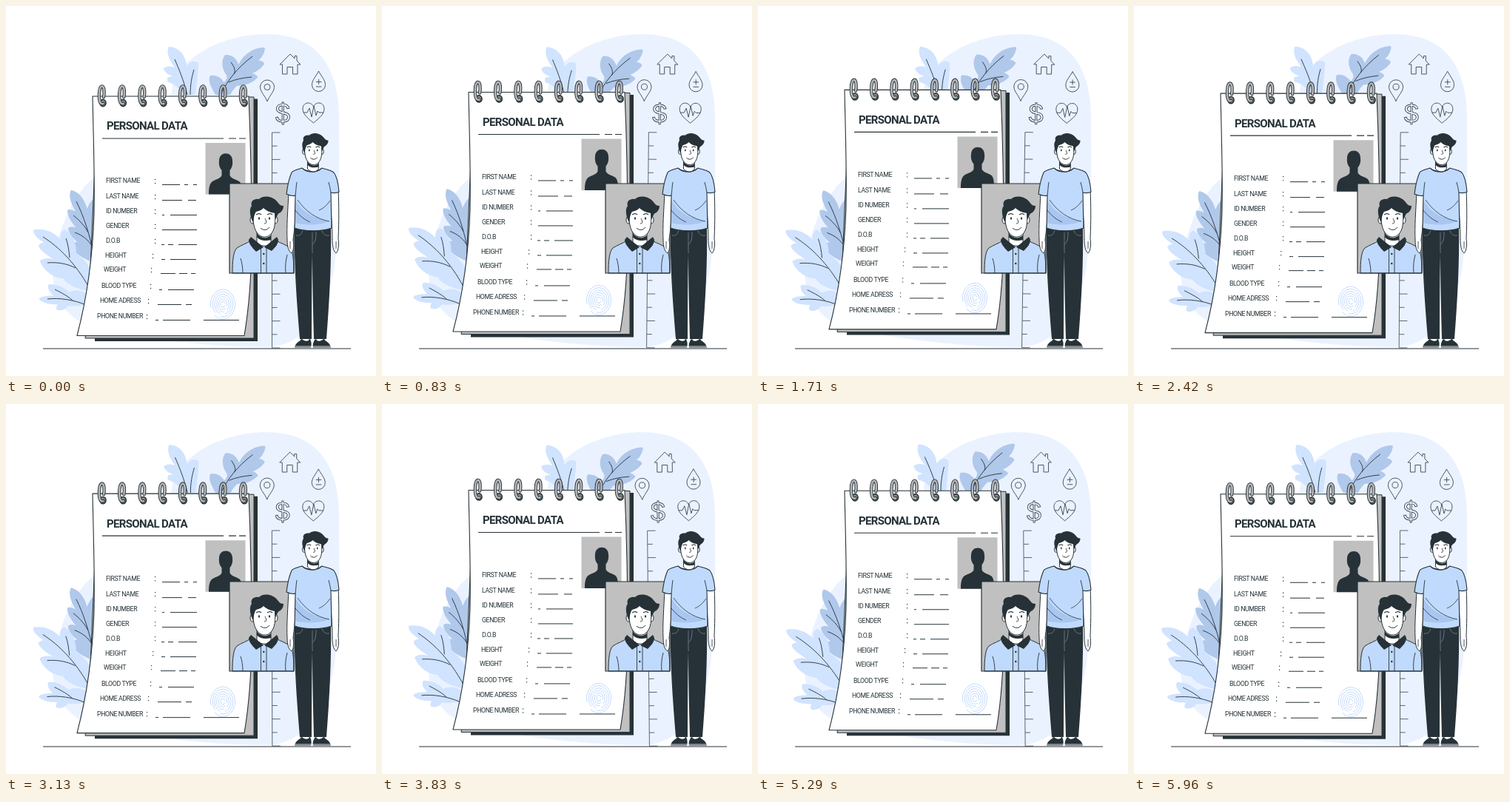
Recreate the animation shown at these times as an HTML page with a canvas. Size 500 by 500 pixels, loop 6 s.

```html
<!DOCTYPE html>
<html lang="en">
<head>
<meta charset="utf-8">
<title>Personal data</title>
<style>
html, body { margin: 0; width: 100%; height: 100%; overflow: hidden; background: #fff; }
canvas { display: block; width: 500px; height: 500px; }
</style>
</head>
<body>
<canvas id="stage"></canvas>
<script>
const canvas = document.getElementById('stage');
const ctx = canvas.getContext('2d');
const dpr = window.devicePixelRatio || 1;
canvas.width = canvas.height = 500 * dpr;

const INK = '#263238', GRAY = '#c0c0c0', BLUE = '#c0dafe', SHADE = '#a9c6f0', PALE = '#ebf2ff';
const LEAF = '#d0e3ff', LEAF_DARK = '#b0c8ea', WHITE = '#fff';

// Shape helpers
function shape(d, fill, stroke, width = 1) {
  const path = new Path2D(d);
  if (fill) { ctx.fillStyle = fill; ctx.fill(path); }
  if (stroke) { ctx.strokeStyle = stroke; ctx.lineWidth = width; ctx.stroke(path); }
}
const line = (d, width = 1, color = INK) => shape(d, null, color, width);
function oval(x, y, rx, ry, fill, stroke, width = 1, from = 0, to = Math.PI * 2) {
  ctx.beginPath();
  ctx.ellipse(x, y, rx, ry, 0, from, to);
  if (fill) { ctx.fillStyle = fill; ctx.fill(); }
  if (stroke) { ctx.strokeStyle = stroke; ctx.lineWidth = width; ctx.stroke(); }
}
function spin(x, y, degrees, draw) {
  ctx.save();
  ctx.translate(x, y);
  ctx.rotate(degrees * Math.PI / 180);
  ctx.translate(-x, -y);
  draw();
  ctx.restore();
}

// Use the narrowest condensed face available, tightly spaced and sized to the lettering
const TRACKING = -0.045;
function pickFont(weight, size, sample, width) {
  const faces = ['Noto Sans', 'Open Sans', 'Roboto', 'Liberation Sans Narrow', 'Liberation Sans'];
  const make = (face, px) => `${weight} extra-condensed ${px}px "${face}", sans-serif`;
  const measure = face => {
    ctx.font = make(face, size);
    return ctx.measureText(sample).width + TRACKING * size * sample.length;
  };
  const best = faces.reduce((a, b) => measure(b) < measure(a) ? b : a);
  const px = size * Math.min(1, width / measure(best));
  return { font: make(best, px), spacing: `${TRACKING * px}px` };
}
const titleFont = pickFont(700, 22.5, 'PERSONAL DATA', 109);
const labelFont = pickFont(400, 12.8, 'PHONE NUMBER', 62);

// label, x, middle y, colon x, dashes as [from, to]
const rows = [
  ['FIRST NAME', 135, 236, 201, [[211, 235], [241, 246], [253, 258]]],
  ['LAST NAME', 135, 257, 201, [[211, 238], [246, 257]]],
  ['ID NUMBER', 135, 277, 201, [[211, 214], [222, 258]]],
  ['GENDER', 135, 297, 201, [[211, 258]]],
  ['D.O.B', 135, 317, 201, [[210, 214], [219, 226], [233, 258]]],
  ['HEIGHT', 134, 337, 198, [[210, 215], [222, 257]]],
  ['WEIGHT', 132, 356, 196, [[209, 229], [234, 245], [250, 256]]],
  ['BLOOD TYPE', 129, 378, 195, [[207, 211], [219, 254]]],
  ['HOME ADRESS', 127, 398, 192, [[205, 237], [243, 251]]],
  ['PHONE NUMBER', 123, 419, 190, [[202, 206], [212, 249]]]
];

function text(str, x, middle, { font, spacing }) {
  ctx.font = font;
  ctx.letterSpacing = spacing;
  ctx.fillStyle = INK;
  const m = ctx.measureText('H');
  ctx.fillText(str, x, middle + m.actualBoundingBoxAscent / 2);
  ctx.letterSpacing = '0px';
}

function drawBackdrop() {
  shape(`M224 118 C224 78 284 38 352 38 C420 38 450 82 450 150 C450 210 452 290 444 350
    C434 420 400 461 350 461 C280 461 210 452 140 440 C90 432 58 400 64 350
    C70 300 92 250 122 230 Z`, PALE);
}

// The matching outline rounds off the lobes
const leaf = (d, color) => shape(d, color, color, 4);

function drawPlants() {
  leaf(`M242 118 C236 110 228 103 220 101 L220 98 C226 97 230 96 231 94 C224 93 217 90 215 85
    C220 82 227 84 233 88 C230 80 218 70 221 57 C230 58 240 64 242 80 C243 87 245 87 247 81
    C250 77 254 76 258 78 C258 90 256 104 254 118 Z`, LEAF);
  line('M228 72 C234 86 240 100 245 120 M254 86 C251 96 249 106 249 120', 0.9);
  leaf(`M284 118 C280 110 275 103 277 96 C284 95 290 99 294 106 C300 102 301 97 300 93
    C293 84 293 74 297 68 C306 68 312 74 314 86 C318 70 332 59 348 58 C347 65 343 71 334 77
    C339 75 344 75 347 78 C341 86 333 90 322 92 C329 91 335 93 338 96 C330 104 320 106 311 106
    C306 111 303 115 302 118 Z`, LEAF_DARK);
  line('M290 120 C299 101 312 84 333 68 M304 76 C310 84 310 89 308 92 M332 96 C320 97 310 99 301 103', 0.9);
  leaf(`M122 346 C108 341 94 334 89 323 C93 320 98 321 105 323 C95 316 87 309 86 301
    C90 299 97 302 103 306 C94 296 85 286 85 277 C90 277 97 281 103 287 C93 274 86 260 89 251
    C98 254 107 264 109 282 C112 272 115 265 120 262 L128 262 Z`, LEAF_DARK);
  line('M95 264 C105 284 113 308 119 338 M91 283 C100 290 107 298 111 306 M93 306 C104 310 111 316 116 324', 0.9);
  leaf(`M116 384 C100 382 84 376 78 366 C66 366 53 357 48 345 C55 341 65 343 74 349
    C66 338 50 334 46 324 C50 320 56 322 62 326 C54 318 40 312 39 304 C54 302 68 309 78 324
    C74 314 75 307 79 304 C88 310 94 322 93 336 C102 341 112 353 116 362 Z`, LEAF);
  line('M50 312 C72 326 94 348 112 380 M56 347 C70 346 82 348 94 354 M81 314 C84 322 85 330 86 340', 0.9);
  leaf(`M110 401 C98 404 90 404 83 403 C80 408 75 410 70 409 C70 406 71 404 74 401
    C62 402 53 401 47 396 C53 393 62 393 70 394 C62 388 58 383 59 378 C68 378 78 382 85 389
    C94 384 102 386 112 392 Z`, LEAF);
  line('M56 396 C72 394 92 397 108 404 M66 383 C76 388 85 393 90 398', 0.9);
}

function drawRuler() {
  let marks = 'M359.5 171 V462';
  for (let i = 0; i < 17; i++) marks += `M359.5 ${171 + i * 18.19} h${i % 2 ? 7 : 11}`;
  line(marks, 0.9, '#455a64');
}

function drawIcons() {
  const c = '#37474f';
  line(`M370 79 L384 65 L390 71 V67.500 H393 V74 L398 79 H394 V92 H387.500 V82.500 H380 V92
    H373.500 V79 Z`, 0.9, c);
  line('M422.500 88 C419 95 413.500 100 413.500 106.500 A9 9 0 0 0 431.500 106.500 C431.500 100 426 95 422.500 88 Z', 0.9, c);
  line('M419 102.500 H426.500 M422.700 99 V106 M419 109 H426.500', 0.9, c);
  line('M353 129 C350 121 343.500 116 343.500 109.500 A9.500 9.500 0 0 1 362.500 109.500 C362.500 116 356 121 353 129 Z', 0.9, c);
  oval(353, 109.5, 4, 4, null, c, 0.9);
  ctx.font = '36px "Liberation Sans", Arial, sans-serif';
  ctx.textAlign = 'center';
  ctx.strokeStyle = c;
  ctx.lineWidth = 0.9;
  ctx.strokeText('$', 374, 157.5);
  ctx.textAlign = 'left';
  line('M415.500 158 C407 151 401 146 401 139 C401 130 412 128 415.500 136 C419 128 430 130 430 139 C430 146 424 151 415.500 158 Z', 0.9, c);
  line('M402 144 H407 L410 138 L413 150 L416 135 L419 148 L421 142 L423 144 H429', 0.9, c);
}

// A wire arch that hooks into a punched hole
function drawRing(x) {
  ctx.save();
  ctx.translate(x, 0);
  ctx.lineCap = 'round';
  oval(1.5, 131, 4, 4.6, '#8a8a8a', INK, 1.6);
  const wire = 'M2 132 C-3 134 -4 126 -3.500 118 C-3 106 2.500 106 3 114 C3.300 118 3 121 2.500 123';
  line(wire, 4.4);
  line(wire, 2.6, '#b5b5b5');
  ctx.restore();
}

function drawNotebook() {
  shape('M124 125.500 H340 V453 H120 V440 Z', INK);
  shape('M124 123 H335 V449 H107 L112 400 Z', GRAY, INK);
  shape(`M117 122 H328 C330 170 332 240 332 310 C332 370 328 410 322 445.500
    H96 C108 400 117 345 119 280 C120 225 118 175 117 122 Z`, WHITE, INK, 1.1);
  for (let i = 0; i < 8; i++) drawRing(129.500 + i * 27.3);

  text('PERSONAL DATA', 136, 162, titleFont);
  line('M130 179 H294 M301 179 H311 M315 179 H324', 1.1);

  for (const [label, x, y, colon, dashes] of rows) {
    text(label, x, y, labelFont);
    oval(colon + 0.6, y - 1.5, 0.7, 0.7, INK);
    oval(colon + 0.6, y + 3.5, 0.7, 0.7, INK);
    line(dashes.map(([a, b]) => `M${a} ${y + 5.5} H${b}`).join(''), 1);
  }

  // Portrait silhouette
  shape('M269.500 185 H323.500 V254.500 H269.500 Z', GRAY);
  shape(`M274 254.500 C274 246 275 240 279 237 C284 234 290 233 291.500 229 L291.500 222
    C288 218 287.500 213 288 209 C288 196 306 196 306 209 C306.500 213 306 218 302.500 222
    L302.500 229 C304 233 310 234 315 237 C319 240 319 247 319 254.500 Z`, INK);

  // Fingerprint
  const print = '#bdd5fb';
  for (let i = 0; i < 6; i++) {
    oval(293, 403, 3 + i * 2.7, 4 + i * 3.2, null, print, 0.9, 0.4 + i * 0.5, 6.1 + i * 0.5);
  }
  line('M267 424.500 H315', 1);
}

function drawFace(x, y, s) {
  ctx.save();
  ctx.translate(x, y);
  ctx.scale(s, s);
  const w = 1 / s;
  shape('M-9 14 V32 C-4 39 6 39 10 32 V14 Z', WHITE, INK, w);
  shape('M-9 20 C-4 27 4 28 10 23 L10 29 C3 31 -6 30 -9 25 Z', INK);
  oval(-15, 2, 3, 5, WHITE, INK, w);
  oval(16, 2, 3, 5, WHITE, INK, w);
  shape('M-14 -18 C-15 0 -14 12 -9 19 C-4 27 6 27 11 20 C17 12 16 0 15 -18 Z', WHITE, INK, w);
  shape(`M-14 6 C-13 0 -13 -5 -10 -9 C-5 -10 -2 -12 0 -14 C5 -9 11 -8 15 -7 L16 2 C18 -2 19 -6 21 -7
    C25 -9 27 -13 27 -17 C23 -17 21 -19 19 -22 C13 -30 0 -32 -6 -26 C-13 -27 -18 -23 -16 -17
    C-20 -12 -18 -2 -14 6 Z`, INK);
  line('M-10 -5 C-7 -7 -5 -7 -3 -5 M5 -5 C8 -7 10 -7 12 -5', 1.2 * w);
  oval(-6, 0, 1.1, 1.8, INK);
  oval(8, 0, 1.1, 1.8, INK);
  line('M2 0 C4 4 5 7 1 7', 0.9 * w);
  line('M-4 13 C0 17 5 16 8 12', w);
  ctx.restore();
}

function drawCard() {
  const frame = 'M302 240 H389 V361 H302 Z';
  shape(frame, GRAY);
  shape(`M306 361 C306 345 307 332 312 327 C318 323 325 321 331 317 L348 324 L365 317
    C372 321 380 323 385 328 C388 333 389 347 389 361 Z`, BLUE, INK);
  drawFace(348, 287, 1);
  shape('M331 312 L348 326 L338 332 C332 326 328 321 328 316 Z', INK);
  shape('M366 312 L349 326 L359 331 C365 325 368 321 368 316 Z', INK);
  line('M344.500 328 V361 M352 327 V361 M317 341 C319 347 320 354 320 361 M380 336 C378 344 377 352 378 361', 0.9);
  oval(348.3, 335, 1.2, 1.2, INK);
  oval(348.3, 348, 1.2, 1.2, INK);
  line(frame, 1.2);
}

function drawMan() {
  // Arms
  shape('M382 250 C381 275 379 300 380 316 C380 325 382 332 386 334 C389 330 389 323 388 316 C391 295 392 272 393 250 Z', WHITE, INK);
  shape('M437 248 C439 275 441 300 441 314 C441 323 442 331 446 334 C450 330 450 321 449 314 C450 290 450 270 449 248 Z', WHITE, INK);
  line('M384 318 V328 M446 318 V328', 0.8);

  // Feet and trousers
  shape('M399 446 H410 V455 H399 Z M419 446 H430 V455 H419 Z', WHITE, INK);
  shape('M390 461.500 C391 455 397 453 400 450 C404 454 409 453 411 450 C413 454 413 458 412 461.500 Z', INK);
  shape('M439 461.500 C438 455 432 453 429 450 C425 454 420 453 418 450 C415 454 414 458 415 461.500 Z', INK);
  line('M390 460 H412 M415 460 H439', 0.8, WHITE);
  shape('M390 298 H439 C440 345 437 400 433 450 H416 C415 410 414 372 414 335 C413 372 413 410 413 450 H397 C393 400 389 350 390 298 Z', INK);
  line('M414 306 V334 M392 310 C397 311 400 308 401 303 M437 310 C432 311 428 308 427 303 M414 322 C418 320 419 314 419 305', 0.7, '#84919a');

  // T-shirt
  const shirt = `M400 219 C394 221 388 222 386 225 C382 234 380 246 379 254 C383 256 388 257 391 256
    L390 300 C404 305 426 305 440 300 L439 252 C443 253 447 253 450 251
    C449 240 447 230 443 225 C438 221 433 221 427 219 C420 225 407 225 400 219 Z`;
  shape(shirt, BLUE);
  shape('M391 262 C398 275 410 286 437 291 C425 296 405 297 390 293 Z', SHADE);
  line(shirt, 1.1);
  line('M391 256 C392 249 392 243 393 238 M439 252 C438 246 437 242 436 238', 0.9);
  line('M394 262 C405 278 420 288 437 291 M391 276 C397 284 404 289 411 292 M438 263 C433 270 428 274 423 276', 0.8);
  drawFace(414.5, 195, 0.78);
  line('M400 219 C406 226 421 226 427 219', 1);
}

// Triangle wave: 0, 1, 0, -1 over one turn
function sway(turn) {
  const p = turn % 1;
  return p < 0.25 ? 4 * p : p < 0.75 ? 2 - 4 * p : 4 * p - 4;
}

function render(t) {
  ctx.setTransform(dpr, 0, 0, dpr, 0, 0);
  ctx.fillStyle = WHITE;
  ctx.fillRect(0, 0, 500, 500);
  ctx.lineJoin = 'round';

  drawBackdrop();
  spin(195, 234, sway(t / 3000), drawPlants);
  spin(387, 263, sway(t / 6000), () => { drawRuler(); drawIcons(); });
  line('M50 463 H466', 1.1);

  ctx.save();
  ctx.translate(0, -10 * (1 - Math.abs(1 - (t % 3000) / 1500)));
  drawNotebook();
  ctx.restore();

  drawCard();
  drawMan();
}

const start = performance.now();
function frame() {
  render((performance.now() - start) % 6000);
  requestAnimationFrame(frame);
}
render(0);
requestAnimationFrame(frame);
</script>
</body>
</html>
```
